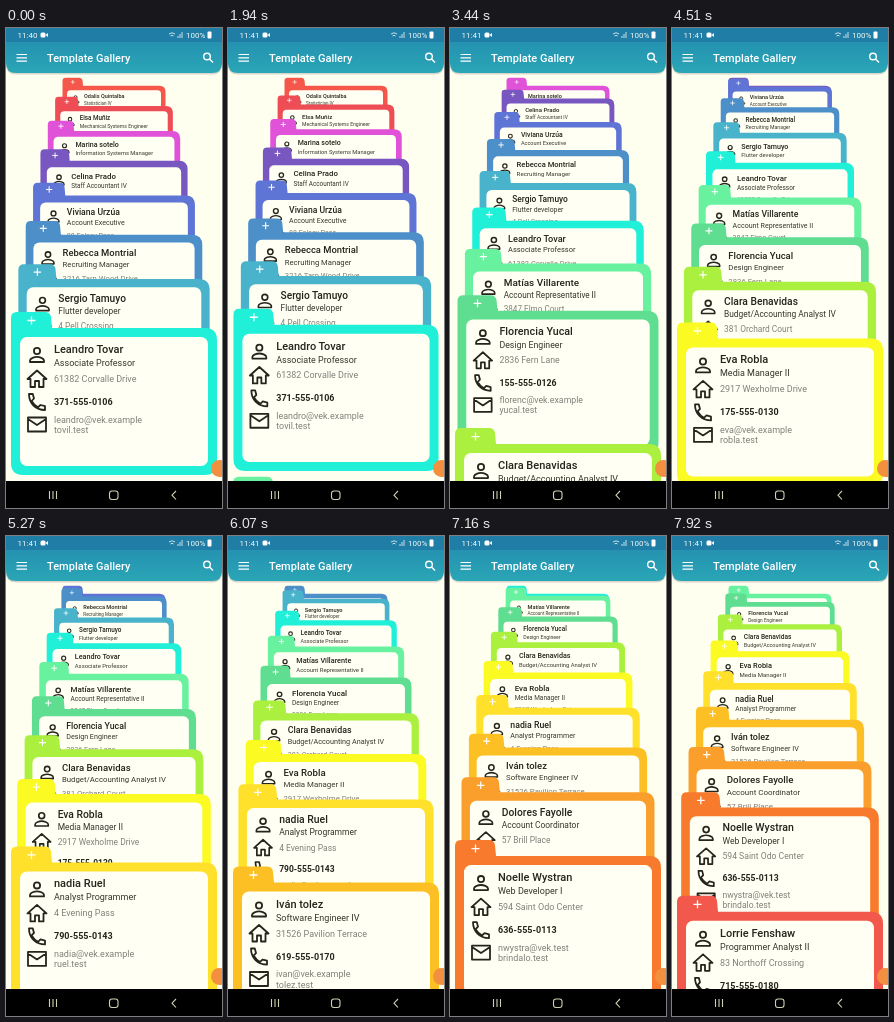
Write an HTML page that moves like this. It is 216 by 480 pixels and loops after 8 s.

```html
<!DOCTYPE html>
<html lang="en">
<head>
<meta charset="utf-8">
<title>Template Gallery</title>
<style>
  html, body { margin: 0; height: 100%; overflow: hidden; background: #fffff0; }
  svg { display: block; width: 100vw; height: 100vh; font-family: Roboto, sans-serif; }
  .page { fill: #fffff0; }
  .paper { fill: #fffff4; }
  .line { fill: none; stroke: #25251c; stroke-width: 1.8; stroke-linejoin: round; }
  .light { fill: none; stroke: #fff; }
  .name { font-size: 11px; font-weight: 500; fill: #25251c; }
  .role { font-size: 9px; fill: #36362c; }
  .soft { font-size: 9px; fill: #80807a; }
  .phone { font-size: 9px; font-weight: 700; fill: #25251c; }
  .status { font-size: 8px; fill: #f4faf4; }
  .title { font-size: 11px; font-weight: 500; fill: #fff; }
</style>
</head>
<body>
<svg viewBox="0 0 216 480" preserveAspectRatio="none">
  <defs>
    <linearGradient id="sea" x2="0" y2="1">
      <stop offset="0" stop-color="#2289ae"/>
      <stop offset="1" stop-color="#2aa6b6"/>
    </linearGradient>
    <g id="icons" class="line">
      <g transform="translate(14 15)">
        <circle cx="12" cy="8" r="3.1"/>
        <path d="M5 19v-1.5c0-2.4 4.7-3.6 7-3.6s7 1.2 7 3.6V19z"/>
      </g>
      <path transform="translate(14 39)" d="M2.5 12 12 3.5 21.5 12H18.5V20H14V14H10V20H5.5V12z"/>
      <path transform="translate(14 62)" d="M4 4H7.8L9 8.500 6.600 11Q9 15.200 13 17.400L15.500 15 20 16.200V20Q13 20 8.500 15.500T4 4z"/>
      <path transform="translate(14 84.500)" d="M3 5H21V19H3zM3 6.500 12 12.500 21 6.500"/>
    </g>
  </defs>

  <rect class="page" width="216" height="480"/>
  <g id="stack"></g>

  <path d="M0 0H216V37Q216 46.500 206 46.500H10Q0 46.500 0 37z" opacity=".16"/>
  <path d="M0 0H216V35Q216 45 206 45H10Q0 45 0 35z" fill="url(#sea)"/>
  <rect width="216" height="14" fill="#207da5"/>
  <text id="clock" class="status" x="11.500" y="10"></text>
  <rect x="34.500" y="4.500" width="5" height="5" rx="1.500" fill="#fff"/>
  <path d="M39.500 7 42 5V9z" fill="#fff"/>
  <path class="light" opacity=".75" d="M163 6q3-2.500 6 0M164.500 8q1.500-1.500 3 0M172 10v-2M174 10v-4M176 10v-6"/>
  <text class="status" x="180" y="10">100%</text>
  <rect x="201.500" y="3.500" width="4" height="7" rx="1" fill="#fff"/>
  <path class="light" stroke-width="1.200" d="M10.500 26.500h10.500M10.500 29.800h10.500M10.500 33.100h10.500"/>
  <text class="title" x="41" y="34">Template Gallery</text>
  <g class="light" stroke-width="1.400">
    <circle cx="201" cy="28.500" r="3.300"/>
    <path d="M203.500 31 207 34.500"/>
  </g>

  <circle cx="213.500" cy="440.500" r="8.500" fill="#f29040"/>
  <rect y="453" width="216" height="27"/>
  <g fill="none" stroke="#cfcfb4" stroke-width="1.100">
    <path d="M43.500 463v8M47 463v8M50.500 463v8"/>
    <rect x="103.500" y="463" width="8.500" height="8.500" rx="2.500"/>
    <path d="M170 463 166 467.200 170 471.500"/>
  </g>
</svg>
<script>
const LOOP = 8000, FIRST = 7;

// colour, name, role, street, phone, mail, site
const people = [
  ['#f5584b', 'Odalis Quintalba', 'Statistician IV'],
  ['#ef4d55', 'Elsa Muñiz', 'Mechanical Systems Engineer'],
  ['#e052d8', 'Marina sotelo', 'Information Systems Manager'],
  ['#7858c0', 'Celina Prado', 'Staff Accountant IV'],
  ['#5f75d6', 'Viviana Urzúa', 'Account Executive', '88 Folsey Pass'],
  ['#4c8fc9', 'Rebecca Montrial', 'Recruiting Manager', '3216 Tarn Wood Drive'],
  ['#48b3cb', 'Sergio Tamuyo', 'Flutter developer', '4 Pell Crossing', '284-555-0117'],
  ['#20f0d8', 'Leandro Tovar', 'Associate Professor', '61382 Corvalle Drive', '371-555-0106', 'leandro@vek.example', 'tovil.test'],
  ['#68f2a0', 'Matías Villarente', 'Account Representative II', '3847 Elmo Court', '462-555-0139', 'matias@vek.example', 'vilar.test'],
  ['#5fdd91', 'Florencia Yucal', 'Design Engineer', '2836 Fern Lane', '155-555-0126', 'florenc@vek.example', 'yucal.test'],
  ['#abf03f', 'Clara Benavidas', 'Budget/Accounting Analyst IV', '381 Orchard Court', '518-555-0144', 'clara@vek.example', 'benav.test'],
  ['#fbfa23', 'Eva Robla', 'Media Manager II', '2917 Wexholme Drive', '175-555-0130', 'eva@vek.example', 'robla.test'],
  ['#ffe02a', 'nadia Ruel', 'Analyst Programmer', '4 Evening Pass', '790-555-0143', 'nadia@vek.example', 'ruel.test'],
  ['#fdc024', 'Iván tolez', 'Software Engineer IV', '31526 Pavilion Terrace', '619-555-0170', 'ivan@vek.example', 'tolez.test'],
  ['#fb9f2c', 'Dolores Fayolle', 'Account Coordinator', '57 Brill Place', '347-555-0152', 'dolores@vek.example', 'fayol.test'],
  ['#f87a2c', 'Noelle Wystran', 'Web Developer I', '594 Saint Odo Center', '636-555-0113', 'nwystra@vek.test', 'brindalo.test'],
  ['#f2584b', 'Lorrie Fenshaw', 'Programmer Analyst II', '83 Northoff Crossing', '715-555-0180', 'lorrie@vek.example', 'fensh.test']
];

// Each swipe brings one card forward: start in ms, stiffness per ms
const swipes = [
  [1907, .012], [2690, .012], [3340, .012], [4133, .012], [4990, .012],
  [5853, .012], [6390, .012], [6850, .012], [7627, .0065]
];

const rows = [['name', 25], ['role', 38], ['soft', 54], ['phone', 77], ['soft', 94.5], ['soft', 105]];

function cardMarkup([color, ...lines]) {
  const text = lines.map((line, i) =>
    `<text class="${rows[i][0]}" x="43" y="${rows[i][1]}">${line}</text>`).join('');
  return `<g>
    <path fill="${color}" d="M0 12V-10Q0-16 6-16H34Q39-16 40-11L41 0H194Q206 0 206 12V135Q206 147 194 147H12Q0 147 0 135z"/>
    <rect class="paper" x="9" y="9" width="188" height="129" rx="7"/>
    <path class="light" stroke-width="1.300" d="M16.500-7.500h8M20.500-11.500v8"/>
    <use href="#icons"/>${text}</g>`;
}

const stack = document.getElementById('stack');
const clock = document.getElementById('clock');
stack.innerHTML = people.map(cardMarkup).join('');
const cards = [...stack.children];

// Critically damped approach from 0 to 1
function settle(x) {
  return x <= 0 ? 0 : 1 - (1 + x) * Math.exp(-x);
}

function place(card, depth) {
  const d = Math.min(depth, 7);
  const scale = 1 - Math.max(d, 0) / 14;
  const y = d < 0 ? 300 - 176 * d : 300 - 51.4 * d + 2.4 * d * d;
  card.style.display = depth >= 8 || depth <= -1 ? 'none' : '';
  card.setAttribute('transform', `translate(${108 - 103 * scale} ${y}) scale(${scale})`);
}

function draw(now) {
  const t = now % LOOP;
  const front = swipes.reduce((sum, [start, rate]) => sum + settle((t - start) * rate), FIRST);
  cards.forEach((card, i) => place(card, front - i));
  clock.textContent = t < 100 ? '11:40' : '11:41';
  requestAnimationFrame(draw);
}
draw(0);
</script>
</body>
</html>
```
